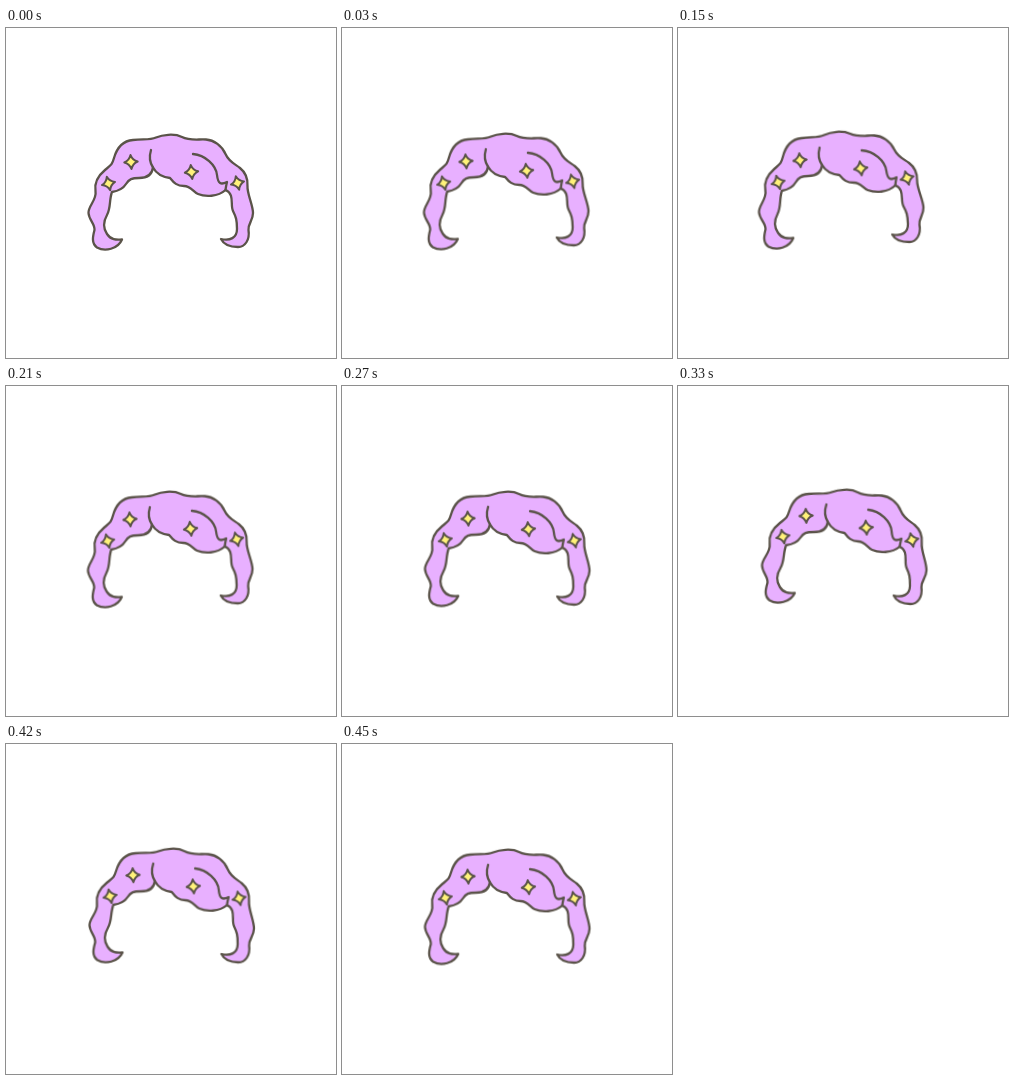
Write an HTML page without scripts that moves like this. It is 330 by 330 pixels and loops after 0.48 s.

```html
<!DOCTYPE html>
<html lang="en">
<head>
<meta charset="utf-8">
<title>Swaying wig</title>
<style>
  html, body { margin: 0; width: 100%; height: 100%; overflow: hidden; background: #fff; }
  svg { display: block; width: 100vw; height: 100vh; }

  .wig {
    fill: #e8b0ff;
    stroke: #5a5349;
    stroke-width: 2.3;
    stroke-linecap: round;
    stroke-linejoin: round;
    transform-origin: 165px 235px;
    animation: sway 480ms steps(4) infinite;
  }
  .strand { fill: none; }
  .star { fill: #fff27a; stroke-width: 2; }

  /* Each quarter of the loop is a straight move in four steps. */
  @keyframes sway {
    0%, 50%, 100% { transform: translateY(0) rotate(0deg); }
    25% { transform: translateY(-4px) rotate(-2.3deg); }
    75% { transform: translateY(-4px) rotate(2.3deg); }
  }
</style>
</head>
<body>
<svg viewBox="0 0 330 330">
  <defs>
    <path id="star" d="M0-7Q1.7-1.7 6.7 0Q1.7 1.7 0 7Q-1.7 1.7-6.7 0Q-1.7-1.7 0-7Z"/>
  </defs>
  <g class="wig">
    <path d="M116 211.5C112 221 99 224 91 219.5C85 215 87 208 88.500 202
      C89 196 83 192 82.500 185S91 172 89.500 163S93 147 99 142S106 137 108 130
      S114 113 127 112S144 112 150 109.500S168 105 176 109S192 111 200 111.500
      S216 118 219.500 126S229 136 234 140S242 150 241.500 158S247 177 247 185
      S242 195 242.500 202C244 212 239 219 232 219S218 217 215 211
      C224 213 231 210 231 201S230 189 227 183S229 166 219.500 162
      C212 169 199 169 192 166C187 164 185 158 178 158S168 155 164 150
      C156 149 150 145 147 139.500C146 147 140 150 133 150S123 151 120 156
      S112 163 106 164C103 172 105 180 101 187S97 200 101 206S110 212 116 211.5Z"/>
    <path class="strand" d="M145 122Q142 132 147 139.500"/>
    <path class="strand" d="M187 126C199 127 210 137 211 147C212 156 215 157 221 154Q220 158 219.500 162"/>
    <g class="star">
      <use href="#star" transform="translate(125 134) rotate(-4)"/>
      <use href="#star" transform="translate(102.500 155.500) rotate(-14)"/>
      <use href="#star" transform="translate(185.500 144) rotate(-6)"/>
      <use href="#star" transform="translate(231.500 155) rotate(-14)"/>
    </g>
  </g>
</svg>
</body>
</html>
```
